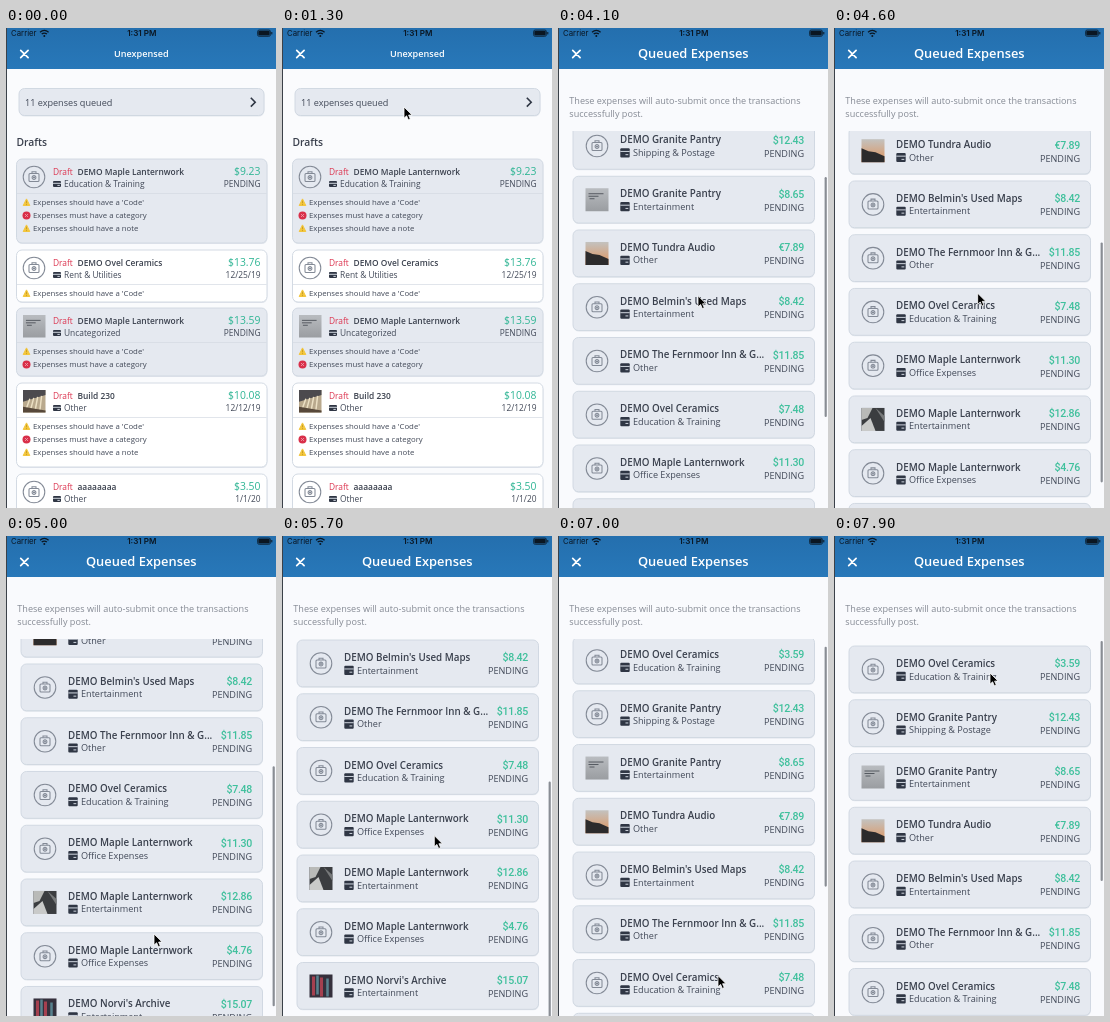
Animation of 270 by 480 pixels, one loop 8 s. Source, as an HTML page:

```html
<!DOCTYPE html>
<html lang="en">
<head>
<meta charset="utf-8">
<title>Expenses</title>
<style>
html, body { margin: 0; width: 100%; height: 100%; overflow: hidden; background: #f9fafc; }
svg { display: block; width: 270px; height: 480px; }
text { font-family: "Open Sans", "Noto Sans", sans-serif; fill: #414857; white-space: pre; }
.b { font-weight: 600; fill: #3a404d; }
.red { fill: #dc3550; }
.green { fill: #2fb594; }
.price { font-family: Roboto, sans-serif; font-weight: 500; fill: #3fc09c; letter-spacing: -.3px; }
.note { fill: #858a94; }
.title { font-weight: 600; fill: #fff; }
.status { font-family: Inter, sans-serif; fill: #0a1622; }
.end { text-anchor: end; }
.mid { text-anchor: middle; }
.line { fill: none; stroke: #838a96; stroke-width: 1.05; }
</style>
</head>
<body>
<svg id="stage" viewBox="0 0 270 480"></svg>
<script>
const text = (x, y, size, str, cls = "") =>
  `<text x="${x}" y="${y}" font-size="${size}" class="${cls}">${str.replace(/&/g, "&amp;")}</text>`;
const rect = (x, y, w, h, fill, extra = "") =>
  `<rect x="${x}" y="${y}" width="${w}" height="${h}" fill="${fill}" ${extra}/>`;
const path = (d, attrs) => `<path d="${d}" ${attrs}/>`;
const panel = (x, y, w, h, fill) =>
  rect(x + .3, y + 1, w, h, "#e3e7ed", 'rx="5.5"') +
  rect(x, y, w, h, fill, 'rx="5.5" stroke="#cfd6e0" stroke-width=".9"');

const GRAY = "#e5e9f0";

const receipt = (x, y) => `<g class="line" transform="translate(${x} ${y})">
  <circle r="10.8"/><rect x="-5" y="-3.5" width="10" height="8" rx="1"/>
  <path d="M-2-3.5V-5.3H2V-3.5"/><circle cy=".5" r="1.9"/><path d="M0-.6V1.6M-1.1.5H1.1"/></g>`;

const card = (x, y, w, h) => rect(x, y, w, h, "#2f3644", 'rx="1"') +
  rect(x, y + h * .3, w, 1, "#cfd5de") + rect(x + w * .55, y + h * .65, w * .3, 1, "#cfd5de");

// Thumbnails, drawn in a 23 unit square.
const photos = {
  paper: rect(0, 0, 23, 23, "url(#paper)") +
    path("M3 5.5H18M3 8H13M4 10.5H9", 'stroke="#555a61" stroke-width="1"'),
  stripes: rect(0, 0, 23, 23, "#b9a98d") + path("M0 0H23V5L0 12Z", 'fill="#4c4a4e"') +
    path("M2 23L7 9M7 23L11 8M12 23L15 7M17 23L19 6", 'stroke="#ece0c4" stroke-width="1.5"') +
    path("M0 23V17L23 21V23Z", 'fill="#57483a"'),
  sunset: rect(0, 0, 23, 23, "url(#sunset)") + path("M0 9L7 12 14 13 23 17V23H0Z", 'fill="#2c2b2c"'),
  dark: rect(0, 0, 23, 23, "#3b3d40") + path("M0 0H11L6 10L0 12Z", 'fill="#b9bab8"') +
    path("M0 23V18L9 10L14 23Z", 'fill="#c9cac9"') + path("M14 0L23 8V14Z", 'fill="#77797a"'),
  shelf: rect(0, 0, 23, 23, "#35303c") + path("M4 2V21M12 3V22", 'stroke="#a5404f" stroke-width="3"') +
    path("M8 1V20M18 4V22", 'stroke="#58828e" stroke-width="2.5"')
};
const thumb = (kind, x, y, size) =>
  `<g transform="translate(${x} ${y}) scale(${size / 23})">${photos[kind]}</g>`;

const warnings = [
  ["Expenses should have a 'Code'", 0],
  ["Expenses must have a category", 1],
  ["Expenses should have a note", 0]
];
const warningIcon = (y, severe) => severe
  ? `<circle cx="20.5" cy="${y}" r="4" fill="#d92f49"/>` +
    path(`M19 ${y - 1.5}l3 3m0-3l-3 3`, 'stroke="#f0a5b0" stroke-width=".8"')
  : path(`M20.5 ${y - 3.6}L23.8 ${y + 3}H17.2Z`, 'fill="#f3c63c" stroke="#f3c63c" stroke-linejoin="round"') +
    path(`M20.5 ${y - 1.8}v2.6m0 .8v1`, 'stroke="#c0951f" stroke-width=".8"');

// y, height, name, category, amount, note, warnings, photo
const drafts = [
  [131, 84, "DEMO Maple Lanternwork", "Education & Training", "$9.23", "PENDING", [0, 1, 2]],
  [222, 52, "DEMO Ovel Ceramics", "Rent & Utilities", "$13.76", "12/25/19", [0]],
  [280, 68, "DEMO Maple Lanternwork", "Uncategorized", "$13.59", "PENDING", [0, 1], "paper"],
  [355, 84, "Build 230", "Other", "$10.08", "12/12/19", [0, 1, 2], "stripes"],
  [446, 84, "aaaaaaaa", "Other", "$3.50", "1/1/20", []]
];
const draft = ([y, h, name, kind, amount, note, list, photo]) =>
  panel(10.5, y, 250.5, h, note === "PENDING" ? GRAY : "#fff") +
  (photo ? thumb(photo, 17, y + 7, 22.5) : receipt(28, y + 18)) +
  text(47, y + 15.5, 8.4, "Draft", "red") + text(71.5, y + 15.5, 8.4, name, "b") +
  card(47, y + 22, 8, 6) + text(58, y + 28, 8.4, kind) +
  text(254.5, y + 16.4, 10.4, amount, "green end") + text(254.5, y + 28, 8.4, note, "end") +
  rect(11, y + 34, 249.5, .7, "#d5dae2") +
  list.map((n, i) => {
    const cy = y + 43.5 + 13 * i;
    return warningIcon(cy, warnings[n][1]) + text(27, cy + 2.9, 7.8, warnings[n][0]);
  }).join("");

const PITCH = 53.75;
const queue = [
  ["Ovel Ceramics", "Education & Training", "$3.59"],
  ["Granite Pantry", "Shipping & Postage", "$12.43"],
  ["Granite Pantry", "Entertainment", "$8.65", "paper"],
  ["Tundra Audio", "Other", "€7.89", "sunset"],
  ["Belmin's Used Maps", "Entertainment", "$8.42"],
  ["The Fernmoor Inn & G...", "Other", "$11.85"],
  ["Ovel Ceramics", "Education & Training", "$7.48"],
  ["Maple Lanternwork", "Office Expenses", "$11.30"],
  ["Maple Lanternwork", "Entertainment", "$12.86", "dark"],
  ["Maple Lanternwork", "Office Expenses", "$4.76"],
  ["Norvi's Archive", "Entertainment", "$15.07", "shelf"]
];
const queued = ([name, kind, amount, photo], i) => {
  const y = 110 + PITCH * i;
  return panel(15, y, 241.5, 46.8, GRAY) +
    (photo ? thumb(photo, 27.5, y + 12, 23) : receipt(39, y + 23.5)) +
    text(62, y + 21, 9.8, "DEMO " + name, "b") +
    card(62.3, y + 25.7, 9.4, 9.2) + text(75, y + 33.5, 9.1, kind) +
    text(246, y + 21.4, 10.6, amount, "price end") + text(246, y + 34.4, 9.1, "PENDING", "end");
};

const header = (title, size, y) => rect(0, 0, 270, 41, "url(#blue)") +
  path("M14.7 22.3l7.4 7.4m0-7.4l-7.4 7.4", 'stroke="#fff" stroke-width="1.7" stroke-linecap="round"') +
  text(135.3, y, size, title, "title mid");

const statusBar = text(5, 8, 7.8, "Carrier", "status") +
  `<g fill="none" stroke="#0a1622" stroke-width="1.3">
    <path d="M34 4.2Q38.3.6 42.6 4.2M35.7 6.1Q38.3 4 40.9 6.1"/></g>
  <circle cx="38.3" cy="7.9" r="1" fill="#0a1622"/>` +
  `<g font-weight="600">${text(135.8, 8, 8.1, "1:31 PM", "status mid")}</g>` +
  rect(251.5, 2, 13, 6.4, "none", 'rx="1.8" stroke="#0a1622" stroke-width=".7"') +
  rect(252.3, 2.8, 11.4, 4.8, "#0a1622", 'rx="1"') + rect(265.3, 4, 1, 2.4, "#0a1622");

const gradient = (id, a, b) => `<linearGradient id="${id}" x2="0" y2="1">
  <stop stop-color="${a}"/><stop offset="1" stop-color="${b}"/></linearGradient>`;

const stage = document.getElementById("stage");
stage.innerHTML = `<defs>
  ${gradient("blue", "#246fae", "#2878b9")}${gradient("paper", "#b9bcc0", "#9a9da1")}
  ${gradient("sunset", "#c3c2bf", "#e0935c")}
  <clipPath id="listArea"><rect y="103" width="270" height="377"/></clipPath></defs>
<g id="first">${rect(0, 0, 270, 480, "#fafbfd")}
  ${panel(13, 60.5, 245, 27, GRAY)}${text(19, 77.6, 9.1, "11 expenses queued")}
  ${path("M244.8 69.8l4.4 4.4-4.4 4.4", 'fill="none" stroke="#2f3644" stroke-width="1.6"')}
  ${text(10.5, 118.2, 10.3, "Drafts", "b")}
  ${drafts.map(draft).join("")}${header("Unexpensed", 9.1, 29.3)}</g>
<g id="second">${rect(0, 0, 270, 480, "#f9fafd")}
  ${text(11.3, 76.3, 9.1, "These expenses will auto-submit once the transactions", "note")}
  ${text(11.3, 88.8, 9.1, "successfully post.", "note")}
  <g clip-path="url(#listArea)"><g id="list">${queue.map(queued).join("")}</g></g>
  <rect id="thumb" x="266.6" width="2.2" height="240" rx="1.1" fill="#898d94"/>
  ${header("Queued Expenses", 12.9, 29.7)}</g>
${statusBar}${rect(0, 0, 1, 480, "#3b4149")}
<path id="cursor" d="M0 0V11.2L2.6 8.8 4.3 12.8 6.3 12 4.6 8.1H8.1Z" fill="#000" stroke="#fff" stroke-width=".8"/>`;

const [first, second, list, thumbBar, cursor] =
  ["first", "second", "list", "thumb", "cursor"].map(id => document.getElementById(id));

// Keyframes: time, then one or more values.
const pointer = [
  [250, 205, 482], [900, 128, 100], [1200, 122, 79], [1600, 122, 79], [2200, 97.5, 73], [3000, 97.5, 73],
  [3450, 138, 337], [3800, 140, 337], [4100, 140, 268], [4300, 141, 215], [4450, 142, 215],
  [5000, 148, 398], [5200, 150, 390], [5450, 150, 300], [6100, 156, 299], [6500, 159, 450],
  [6700, 160, 466], [7000, 160, 440], [7800, 156, 137]
];
const scroll = [
  [3800, 0], [4100, 69], [4300, 122], [4600, 172], [5000, 197], [5200, 203], [5450, 221],
  [6100, 221], [6500, 70], [6700, 32], [7000, 9], [7300, 0]
];
function at(keys, t) {
  const i = keys.findIndex(k => k[0] > t);
  if (i < 1) return keys[i ? keys.length - 1 : 0].slice(1);
  const a = keys[i - 1], b = keys[i], p = (t - a[0]) / (b[0] - a[0]);
  return a.slice(1).map((v, n) => v + (b[n + 1] - v) * p);
}
const move = (el, x, y) => el.setAttribute("transform", `translate(${x} ${y})`);

function draw(now) {
  const t = now % 8000;
  const p = 1 - (1 - Math.min(1, Math.max(0, (t - 2550) / 430))) ** 3;
  move(first, -80 * p, 0);
  move(second, 270 * (1 - p), 0);
  const [y] = at(scroll, t);
  move(list, 0, -y);
  thumbBar.setAttribute("y", 105 + y * .636);
  thumbBar.setAttribute("opacity", t > 3750 ? 1 : 0);
  move(cursor, ...at(pointer, t));
}
function loop() {
  draw(performance.now());
  requestAnimationFrame(loop);
}
loop();
</script>
</body>
</html>
```
